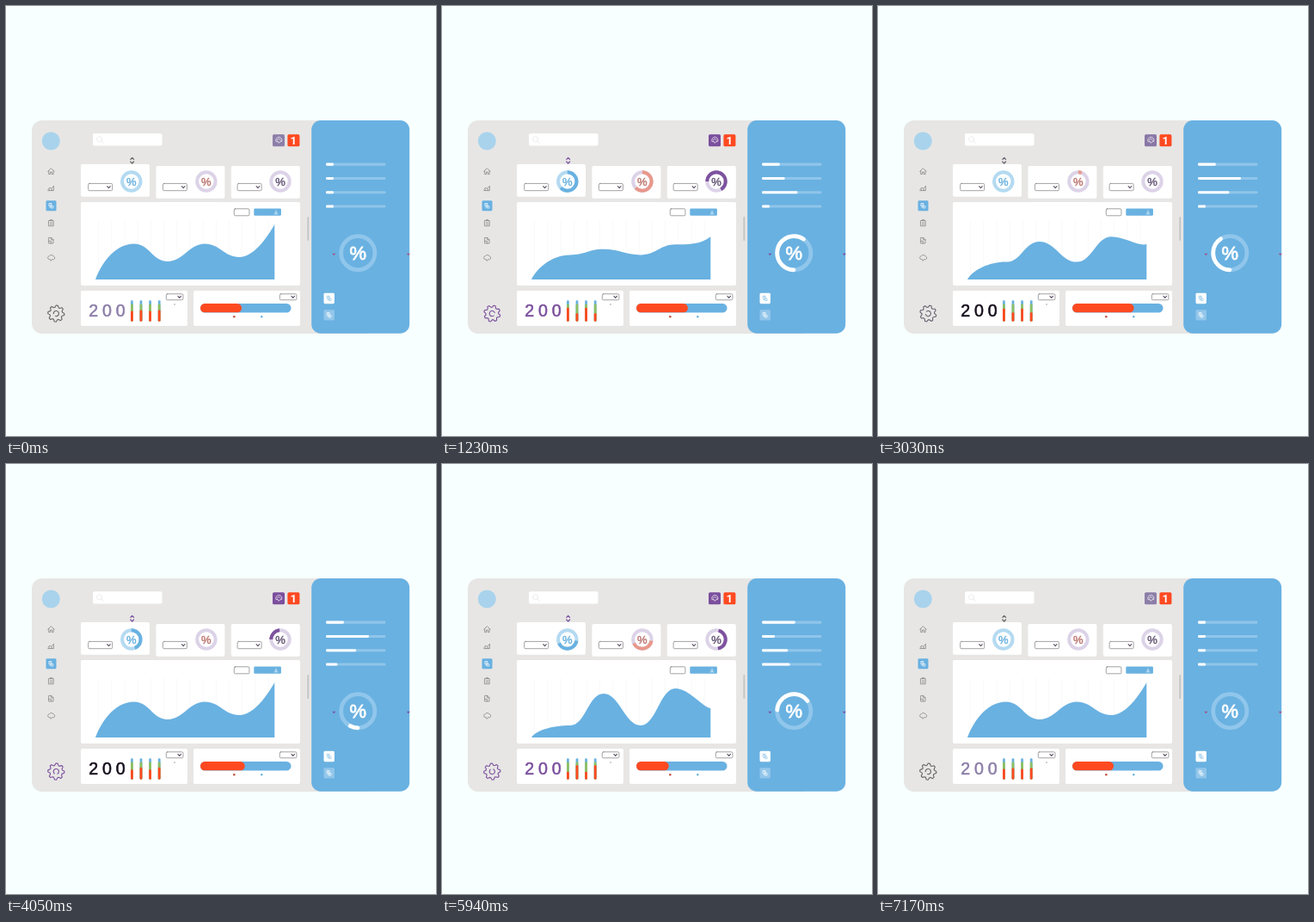
These frames come from a looping animation (500x500 px, 7.23 s). An HTML page:

```html
<!DOCTYPE html>
<html lang="en">
<head>
<meta charset="utf-8">
<title>Dashboard</title>
<style>
  html, body { margin: 0; width: 100%; height: 100%; overflow: hidden; background: #f7ffff; }
  svg { display: block; width: 100%; height: 100%; }
  text { font-family: "Liberation Sans", Arial, sans-serif; }
  .mid { text-anchor: middle; }
  .line { fill: none; stroke: #7c7c7c; stroke-width: .7; stroke-linecap: round; stroke-linejoin: round; }
  .light { stroke: #fff; }
  .chevron { stroke: #5c5064; stroke-width: 1.1; }
</style>
</head>
<body>
<svg id="stage" viewBox="0 0 500 500">
  <defs>
    <clipPath id="pill"><rect x="226" y="346" width="105.5" height="10.5" rx="5.2"/></clipPath>
    <path id="doc" d="M-2.2 -2.8h2.6v3h-2.6zM.3 .2h2v2.4h-2zM-1.5 -1.5h1.2M-1.8 1.6h1"/>
  </defs>

  <rect x="30" y="133" width="400" height="248" rx="12" fill="#e7e6e5"/>
  <rect x="355.2" y="133" width="114" height="247.7" rx="10.8" fill="#69b1e1"/>
  <circle cx="52.3" cy="157" r="10.5" fill="#a9d3ec"/>

  <!-- top row -->
  <rect x="101" y="148.2" width="80.5" height="14.3" rx="2" fill="#fff"/>
  <g class="line" style="stroke:#e4e4e4"><circle cx="108.6" cy="154.8" r="3"/><path d="M111 157l2.4 2.4"/></g>
  <rect id="badge" x="310" y="149.3" width="14" height="14" rx="1.6"/>
  <path class="line light" d="M314 157.5a3.6 3.6 0 1 1 6.6 0l-2 .3l-1.4 1.6l-1-1.8z M315.4 155.8l2-1.4l2 1.6"/>
  <rect x="327.4" y="149.3" width="14" height="14" rx="1.6" fill="#ff4a21"/>
  <text class="mid" x="334.2" y="160.9" font-size="13" fill="#fff" style="font-family:Roboto,sans-serif;font-weight:bold">1</text>
  <path id="sorter" class="line" style="stroke-width:1.2" d="M144.8 178.3l1.9-2l1.9 2M144.8 181l1.9 2l1.9-2"/>

  <!-- side menu -->
  <g class="line">
    <path d="M48.6 192.4l3.8-3.8l3.8 3.8M49.7 191.6v4h1.8v-2.6h1.8v2.6h1.8v-4"/>
    <path d="M48.8 214.6h6.6v-5M49 213l2-2l1.4 1.4l3-3M50.2 213v1.4M53.2 212.6v2"/>
    <path d="M49.8 249.6h5.4v6.2h-5.4zM51.4 249.6v-1h2.2v1M51.2 252h2.6M51.2 254h2.6"/>
    <path d="M50 269.4h2.8l2.2 2.2v4.4h-5zM52.6 269.4v2.4h2.2M50 273.4h2.4v2.4"/>
    <path d="M49.8 294.6a2 2 0 0 1 .4-3.8a3 3 0 0 1 5.2 .4a1.8 1.8 0 0 1 .2 3.4l-2.2 .2l-1.2 1.6l-.8-1.6z"/>
  </g>
  <rect x="46.5" y="226.3" width="12" height="12" rx="1.4" fill="#69b1e1"/>
  <use href="#doc" x="52.5" y="232.4" class="line light"/>
  <g id="gear" class="line" style="stroke-width:1.1"></g>

  <!-- cards -->
  <g id="cards" fill="#fff"></g>
  <g id="grid" stroke="#f8f8f8" stroke-width=".8"></g>
  <path id="area" fill="#69b1e1"/>
  <rect class="line" x="265.3" y="235.8" width="17.6" height="8" rx="1.2"/>
  <rect x="288.3" y="235.5" width="31.6" height="8.3" rx="1.2" fill="#69b1e1"/>
  <path class="line light" style="stroke-width:.6" d="M312 241.8h4M314 238v2.6M313 239.8l1 1l1-1"/>
  <rect x="350.4" y="245" width="1.8" height="28" rx=".9" fill="#c3c3c3"/>
  <g id="selects" class="line"></g>
  <g id="rings"></g>

  <!-- counters -->
  <text id="count" x="96.3" y="360.6" font-size="19.6" letter-spacing="4.8" stroke-width=".55">200</text>
  <g id="columns"></g>
  <circle cx="196" cy="347" r=".8" fill="#999"/>
  <g clip-path="url(#pill)">
    <rect x="226" y="346" width="106" height="11" fill="#69b1e1"/>
    <rect id="level" x="220" y="346" height="10.5" rx="5.2" fill="#ff4a21"/>
  </g>
  <circle cx="265.3" cy="361.3" r="1.3" fill="#c0533f"/>
  <circle cx="297.3" cy="361.3" r="1.2" fill="#69b1e1"/>

  <!-- blue panel -->
  <g id="sliders"></g>
  <path id="ticks" d="M379.3 287.8h4l-2 2.4zM465.8 287.8h4l-2 2.4z"/>
  <rect x="369.5" y="333.8" width="12.4" height="12.4" rx="1.4" fill="#fff"/>
  <use href="#doc" x="375.7" y="340" class="line" style="stroke:#8cc4ea"/>
  <rect x="369.5" y="353.2" width="12.4" height="12.4" rx="1.4" fill="#92c6ea"/>
  <use href="#doc" x="375.7" y="359.4" class="line light"/>
</svg>

<script>
const LOOP = 7230, STEP = 30, END = 7170;
const $ = id => document.getElementById(id);

const set = (el, attrs) => { for (const k in attrs) el.setAttribute(k, attrs[k]); };
function add(parent, tag, attrs) {
  const el = document.createElementNS("http://www.w3.org/2000/svg", tag);
  set(el, attrs);
  return parent.appendChild(el);
}
const mix = (a, b, k) => a + (b - a) * k;
const blend = (a, b, k) => a.map((v, i) => mix(v, b[i], k));
const rgb = c => `rgb(${c.map(Math.round)})`;

// Eased 0 to 1 between two times
function ease(t, from, to) {
  const u = Math.min(1, Math.max(0, (t - from) / (to - from)));
  return (1 - Math.cos(Math.PI * u)) / 2;
}
// Eased path through [time, value] points
function path(t, points) {
  return points.slice(1).reduce(
    (v, [time, next], i) => mix(v, next, ease(t, points[i][0], time)), points[0][1]);
}

// Cards and select boxes
function card(x, y, width, height) {
  add($("cards"), "rect", { x, y, width, height, rx: 2 });
}
function select(x, y, width, height) {
  add($("selects"), "rect", { x, y, width, height, rx: 1.4 });
  add($("selects"), "path", { class: "chevron", d: `M${x + width - 6} ${y + height / 2 - .9}l1.8 1.9l1.8-1.9` });
}
for (let i = 0; i < 3; i++) {
  card(87 + 87.4 * i, i ? 186 : 184, 80, 37.8);
  select(95.7 + 86.7 * i, 206.4, 28, 8.3);
}
card(87, 228, 255, 97);
card(87, 331, 124, 41);
card(218, 331, 124, 41);
select(186.3, 334.8, 19.6, 7);
select(318.3, 334.8, 19.6, 7);
for (let x = 107.5; x < 312; x += 15.2)
  add($("grid"), "line", { x1: x, x2: x, y1: 249, y2: 318 });

// Gear with eight teeth
let teeth = "";
for (let i = 0; i < 32; i++) {
  const side = i % 4, r = side === 1 || side === 2 ? 9.6 : 7.3;
  const a = (Math.floor(i / 4) * 45 + (side - 1.5) * 12) * Math.PI / 180;
  teeth += `${i ? "L" : "M"}${r * Math.sin(a)} ${-r * Math.cos(a)}`;
}
add($("gear"), "path", { d: teeth + "Z" });
add($("gear"), "path", { d: "M1.8 -2.5A3.1 3.1 0 1 1 -1.8 -2.5" });

// Rings fill, empty by `gone`, refill from `back`, then their tail catches up
const small = { y: 204, r: 10.7, w: 4, size: 13, bold: .4, cap: "butt", from: 0, sweep: 245, gone: 3000 };
const rings = [
  { ...small, x: 145.8, rail: "#b4daf1", ink: "#69b1e1", text: "#62aede", back: 3100 },
  { ...small, x: 232.9, rail: "#dcd3e8", ink: "#e8988c", text: "#b8706b", gone: 3250, back: 4050 },
  { ...small, x: 319, rail: "#dcd3e8", ink: "#7d529e", text: "#5e5070", from: 270, sweep: 260, back: 3430 },
  { x: 409.3, y: 287.2, r: 19.6, w: 4.8, size: 22, bold: .8, cap: "round", rail: "#90c6eb", ink: "#fff",
    text: "#fff", from: 181, sweep: 232, gone: 3700, back: 3700 }
];
for (const g of rings) {
  const base = { cx: g.x, cy: g.y, r: g.r, fill: "none", "stroke-width": g.w };
  add($("rings"), "circle", { ...base, stroke: g.rail });
  g.arc = add($("rings"), "circle", { ...base, stroke: g.ink, pathLength: 360, "stroke-linecap": g.cap });
  add($("rings"), "text", {
    class: "mid", x: g.x, y: g.y + g.size * .35, "font-size": g.size,
    fill: g.text, stroke: g.text, "stroke-width": g.bold
  }).textContent = "%";
}
function drawRing(g, t) {
  const head = g.sweep * (ease(t, 0, 1500) - ease(t, g.gone - 1150, g.gone) + ease(t, g.back, g.back + 1600));
  const tail = g.sweep * ease(t, 5200, 6900);
  set(g.arc, {
    "stroke-dasharray": `${Math.max(0, head - tail)} 720`,
    transform: `rotate(${g.from + tail - 90} ${g.x} ${g.y})`,
    visibility: head - tail > 1 ? "visible" : "hidden"
  });
}

// Sliders rest at a short stub and pass through a few fill levels
const REST = .13;
const sliders = [
  [[1200, .3], [4000, .3], [5300, .71]],
  [[2700, .72], [4050, .72], [5400, .24]],
  [[1300, .6], [3900, .5], [5010, .63]],
  [[3700, REST], [5200, .62]]
].map((stops, i) => {
  const bar = { x: 372, y: 182.6 + i * 16.3, height: 3.1, rx: 1.4 };
  add($("sliders"), "rect", { ...bar, width: 69.5, fill: "#8fc5ea" });
  return { el: add($("sliders"), "rect", { ...bar, fill: "#fff" }), points: [[0, REST], ...stops, [END, REST]] };
});

// Neighbouring columns move in opposite directions
const columns = [0, 1, 2, 3].map(i => {
  const bar = (y, fill) => add($("columns"), "rect",
    { x: 145 + i * 10.6, y, width: 2.8, height: 366.8 - y, rx: 1.3, fill });
  bar(342.3, "#69b1e1");
  bar(346.5, "#8cc063");
  return bar(350, "#ff4a21");
});

const wave = [[0, 0], [2550, 1], [4050, 0], [5500, 1], [5940, 1], [END, 0]];
const level = [[0, 274], [2600, 300], [5300, 260], [END, 274]];
const glow = [[0, 0], [1200, 1], [3000, .15], [4100, 1], [6200, 1], [END, 0]];
const dusk = [[2000, 0], [3000, 1], [4100, 1], [4900, 0]];
const PURPLE = [123, 79, 157], LILAC = [140, 126, 168], GREY = [100, 100, 102], ROSE = [164, 84, 130], DARK = [22, 14, 27];

function areaPath(k) {
  const peak = mix(276.5, 304, k), dip = mix(297, 267, k), low = mix(292, 261, k);
  const bend = (x1, y1, x2, y2) => `C${x1 + 18} ${y1} ${x2 - 18} ${y2} ${x2} ${y2}`;
  return `M104 318C110 ${mix(302, 309, k)} ${mix(125, 130, k)} ${peak} 149 ${peak}`
    + bend(149, peak, 188, dip) + bend(188, dip, 231, peak) + bend(231, peak, 271.5, low)
    + `C287 ${low} 302 ${mix(272, 282, k)} 312.3 ${mix(254, 284, k)}V318Z`;
}

function draw(t) {
  for (const g of rings) drawRing(g, t);
  for (const s of sliders) set(s.el, { width: 69.5 * path(t, s.points) });
  columns.forEach((el, i) => {
    const y = 354 + (i % 2 ? -4 : 4) * Math.cos(2 * Math.PI * (t - 5500) / END);
    set(el, { y, height: 366.8 - y });
  });
  set($("level"), { width: path(t, level) - 220 });
  set($("area"), { d: areaPath(path(t, wave)) });

  const k = path(t, glow);
  const lilac = blend(LILAC, PURPLE, k);
  const count = rgb(blend(lilac, DARK, path(t, dusk)));
  set($("count"), { fill: count, stroke: count });
  set($("badge"), { fill: rgb(lilac) });
  set($("ticks"), { fill: rgb(blend(ROSE, PURPLE, k)) });
  $("sorter").style.stroke = $("gear").style.stroke = rgb(blend(GREY, PURPLE, k));
  set($("gear"), { transform: `translate(58.3 357.6) rotate(${231 - 720 * t / END})` });
}

const start = performance.now();
function frame() {
  const t = (performance.now() - start) % LOOP;
  draw(Math.min(END, Math.floor(t / STEP) * STEP));
  requestAnimationFrame(frame);
}
frame();
</script>
</body>
</html>
```
